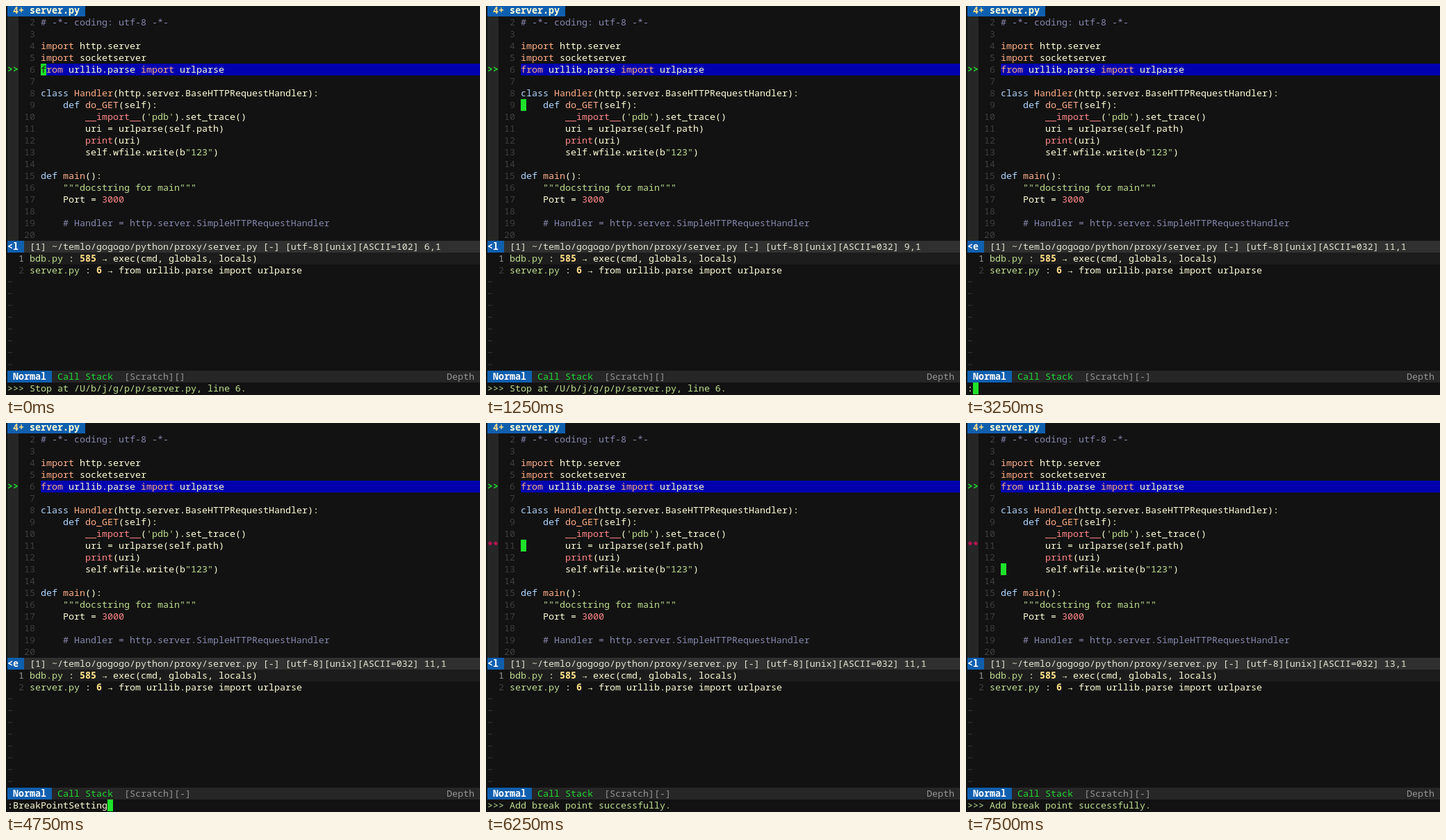
Write an HTML page with a canvas that moves like this. It is 682 px wide and 560 px high and loops after 8 s.

```html
<!DOCTYPE html>
<html>
<head>
<meta charset="utf-8">
<style>
html, body { margin: 0; width: 100%; height: 100%; overflow: hidden; background: #121212; }
canvas { display: block; }
</style>
</head>
<body>
<canvas id="stage" width="682" height="560"></canvas>
<script>
const ctx = document.getElementById("stage").getContext("2d");
const LOOP = 8000, CELL_W = 8, CELL_H = 17;
const BG = "#121212", BLUE = "#0f5faf", BAR = "#303030", CURSOR = "#1fe02a";
const COLORS = {
  n: "#ffffd7", // normal
  p: "#ffaf87", // import, function names
  d: "#afd7ff", // class, def
  k: "#ff8787", // builtins, numbers
  s: "#bfdf8f", // strings, messages
  c: "#8787af", // comments
  y: "#ffdf87", w: "#ffffff", l: "#e4e4d4",
  g: "#22d832", r: "#d7105f", m: "#949494", f: "#3e3e3e", x: "#121212"
};

// {k|text} colours a piece of text with COLORS.k
const CODE = [
  "{c|# -*- coding: utf-8 -*-}",
  "",
  "{p|import} http.server",
  "{p|import} socketserver",
  "{p|from} urllib.parse {p|import} urlparse",
  "",
  "{d|class} {p|Handler}(http.server.BaseHTTPRequestHandler):",
  "    {d|def} {p|do_GET}(self):",
  "        {k|__import__}({s|'pdb'}).set_trace()",
  "        uri = urlparse(self.path)",
  "        {k|print}(uri)",
  "        self.wfile.write(b{s|\"123\"})",
  "",
  "{d|def} {p|main}():",
  "    {s|\"\"\"docstring for main\"\"\"}",
  "    Port = {k|3000}",
  "",
  "    {c|# Handler = http.server.SimpleHTTPRequestHandler}",
  ""
];
const plain = CODE.map(s => s.replace(/\{\w\||\}/g, ""));

// [start time, cursor line]
const MOVES = [[0, 6], [500, 7], [1000, 8], [1250, 9], [1500, 10], [1750, 11], [7250, 12], [7500, 13]];
// [start time, command line]
const COMMANDS = [[3250, ":"], [4250, ":b"], [4500, ":br"], [4750, ":BreakPointSetting"]];
const COMMAND_START = 3250, COMMAND_END = 5750;

const latest = (steps, t) => steps.filter(s => s[0] <= t).pop()[1];
const cellX = col => 2 + col * CELL_W;
const cellY = row => row * CELL_H - 2;

function fill(row, col, cols, color, rows = 1) {
  ctx.fillStyle = color;
  ctx.fillRect(cellX(col), cellY(row), cols * CELL_W, rows * CELL_H);
}

function write(row, col, text, base = "n", bold = false) {
  for (const [, key, marked, unmarked] of text.matchAll(/\{(\w)\|([^}]*)\}|([^{]+)/g)) {
    const piece = marked ?? unmarked;
    const weight = bold || key === "y" ? "bold" : "normal";
    ctx.font = `${weight} 13.3333px "Noto Sans Mono", "DejaVu Sans Mono", monospace`;
    ctx.fillStyle = COLORS[key || base];
    ctx.fillText(piece, cellX(col), cellY(row) + 13);
    col += piece.length;
  }
}

function drawEditor(line, commandMode, hasBreakpoint) {
  fill(0, 0, 14, BLUE);
  write(0, 1, "{y|4+} server.py", "n", true);
  fill(1, 0, 2, "#262626", 19);
  fill(5, 6, 79, "#0000af");
  CODE.forEach((text, i) => {
    write(i + 1, 2, String(i + 2).padStart(3), "f");
    write(i + 1, 6, text);
  });
  write(5, 0, ">>", "g", true);
  if (hasBreakpoint) write(10, 0, "**", "r", true);

  const under = plain[line - 2][0] || "";
  if (!commandMode) {
    fill(line - 1, 6, 1, CURSOR);
    write(line - 1, 6, under, "x");
  }
  const ascii = String(under ? under.charCodeAt(0) : 0).padStart(3, "0");
  const column = under ? "1" : "0-1";
  fill(20, 0, 85, BAR);
  fill(20, 0, 3, BLUE);
  write(20, 0, commandMode ? "<e" : "<l", "w", true);
  write(20, 4, `[1] ~/temlo/gogogo/python/proxy/server.py [-] [utf-8][unix][ASCII=${ascii}] ${line},${column}`, "l");
}

function drawStack(modified) {
  fill(21, 4, 81, "#1c1c1c");
  write(21, 2, "1", "m");
  write(21, 4, "{s|bdb.py} : {y|585} → exec(cmd, globals, locals)");
  write(22, 2, "2", "f");
  write(22, 4, "{s|server.py} : {y|6} → from urllib.parse import urlparse");
  for (let row = 23; row <= 30; row++) write(row, 0, "~", "f");
  fill(31, 0, 85, "#262626");
  fill(31, 0, 8, BLUE);
  write(31, 1, "Normal", "w", true);
  write(31, 9, "Call Stack", "g");
  write(31, 21, modified ? "[Scratch][-]" : "[Scratch][]", "m");
  write(31, 79, "Depth", "m");
}

function draw(now) {
  const t = now % LOOP;
  const commandMode = t >= COMMAND_START && t < COMMAND_END;
  const done = t >= COMMAND_END;
  ctx.fillStyle = BG;
  ctx.fillRect(0, 0, 682, 560);
  drawEditor(latest(MOVES, t), commandMode, done);
  drawStack(t >= COMMAND_START);
  if (commandMode) {
    const command = latest(COMMANDS, t);
    write(32, 0, command);
    fill(32, command.length, 1, CURSOR);
  } else {
    write(32, 0, done ? ">>> Add break point successfully." : ">>> Stop at /U/b/j/g/p/p/server.py, line 6.", "s");
  }
  requestAnimationFrame(draw);
}
draw(performance.now());
</script>
</body>
</html>
```
